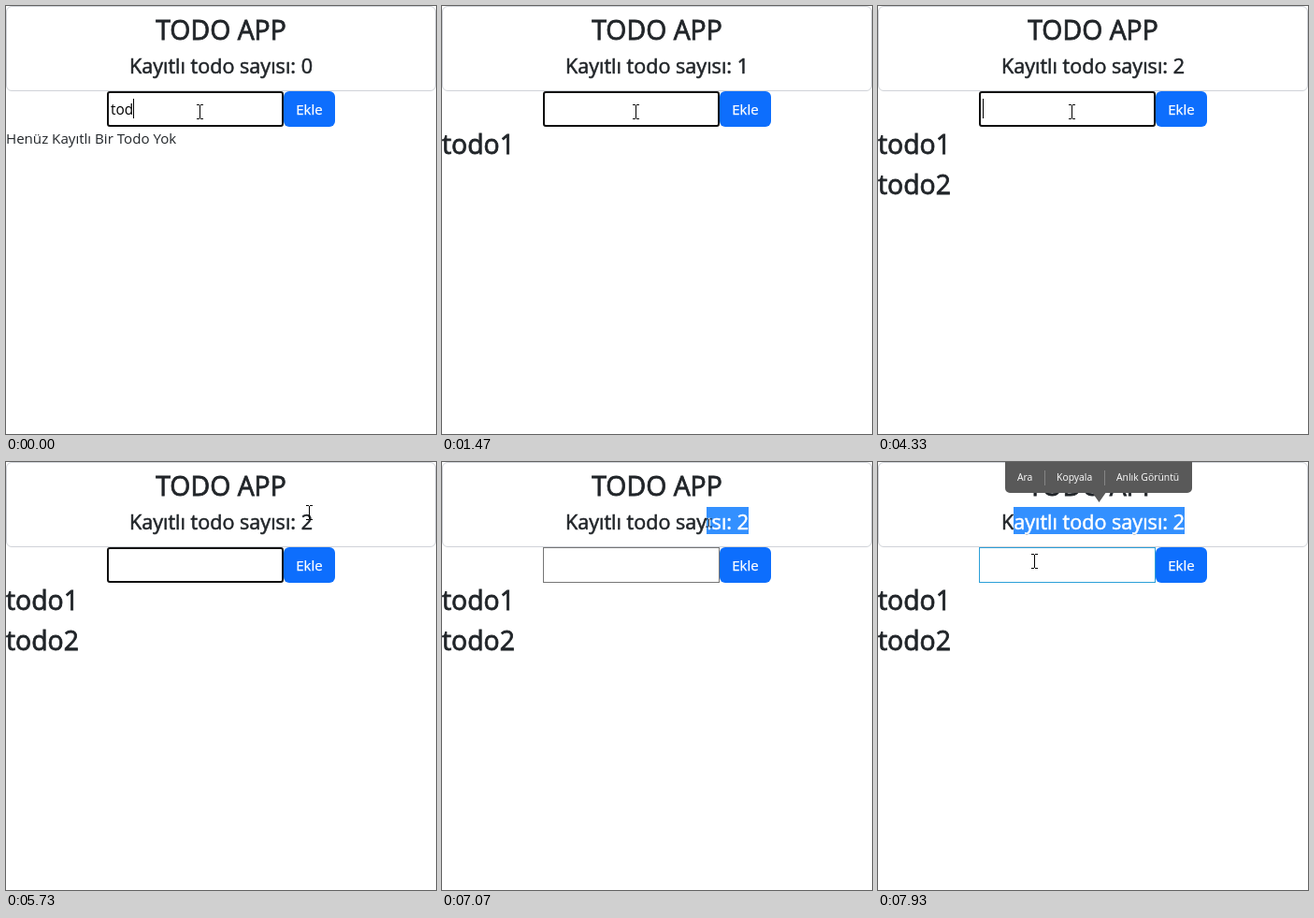
Write an HTML page that moves like this. It is 460 px wide and 457 px high and loops after 8 s.

```html
<!DOCTYPE html>
<html lang="tr">
<head>
<meta charset="utf-8">
<title>Todo App</title>
<style>
  html, body { margin: 0; width: 100%; height: 100%; overflow: hidden; background: #fff; }
  svg { display: block; width: 460px; height: 457px; font-family: "Open Sans", "Noto Sans", sans-serif; }
  text { color: #212529; fill: currentColor; stroke: currentColor; stroke-width: 0; white-space: pre; }
  /* A thin outline gives the medium weight between regular and semibold. */
  .big { font-size: 28.4px; stroke-width: .8px; }
  .count { font-size: 21.55px; stroke-width: .55px; }
  .body { font-size: 15.1px; }
  .typed { font-size: 15.4px; color: #000; }
  .mid { text-anchor: middle; }
  .white { color: #fff; }
  .label { stroke-width: .25px; }
  .tip text { font-size: 10.4px; color: #fff; }
  .crisp { shape-rendering: crispEdges; }
</style>
</head>
<body>
<svg viewBox="0 0 460 457">
  <defs><clipPath id="selClip"><rect id="clipBox" y="48" height="29"/></clipPath></defs>

  <rect x=".5" y=".5" width="459" height="90" rx="5.5" fill="#fff" stroke="#d0d3d8"/>
  <text class="big mid" x="230" y="36">TODO APP</text>
  <text class="count mid" id="count" x="230" y="72"></text>
  <g id="selection">
    <rect id="selBox" y="48" height="29" fill="#3390ff"/>
    <text class="count mid white" id="countSel" x="230" y="72" clip-path="url(#selClip)"></text>
  </g>

  <rect id="focused" x="109" y="92" width="187" height="36" rx="2" fill="#fff" stroke="#101010" stroke-width="2"/>
  <rect id="blurred" x="108.5" y="91.5" width="188" height="37" fill="#fff" stroke="#767676"/>
  <text class="typed" id="typed" x="112" y="116"></text>
  <rect class="crisp" id="caret" y="99" width="1" height="21"/>
  <rect x="297" y="91" width="55" height="38" rx="6" fill="#0d6efd"/>
  <text class="body mid white label" x="324.5" y="116">Ekle</text>

  <text class="body" id="empty" x="0" y="147">Henüz Kayıtlı Bir Todo Yok</text>
  <text class="big" id="item1" x="0" y="158">todo1</text>
  <text class="big" id="item2" x="0" y="201">todo2</text>

  <g class="tip" id="tip">
    <path d="M136 0H336V28a5 5 0 0 1-5 5H243.500L236.500 43L229.500 33H141a5 5 0 0 1-5-5Z" fill="#595959"/>
    <path class="crisp" d="M178.500 9V25M242.500 9V25" stroke="#858585"/>
    <text x="149" y="20">Ara</text>
    <text x="191" y="20">Kopyala</text>
    <text x="255" y="20">Anlık Görüntü</text>
  </g>

  <path class="crisp" id="beam" fill="none" stroke="#000" d="M-3 -7.500H0M1 -7.500H4M.5 -7V7M-3 7.500H0M1 7.500H4"/>
  <path id="arrow" fill="#fff" stroke="#000" stroke-linejoin="round"
    d="M.5 .5V16.500L4.200 13L6.600 18.500L9 17.500L6.600 12H11.500Z"/>
</svg>
<script>
  const LOOP = 8000, FPS = 15;
  const el = Object.fromEntries([...document.querySelectorAll("[id]")].map(e => [e.id, e]));

  // time, input text, caret visible
  const typing = [
    [0, "tod", 1], [200, "todo", 1], [730, "todo1", 1], [1270, "todo1", 0],
    [1470, "", 0], [1800, "", 1], [2330, "", 0],
    [2530, "t", 1], [2730, "to", 1], [3200, "tod", 1], [3330, "todo", 1], [3800, "todo2", 1],
    [4330, "", 1], [4400, "", 0], [4870, "", 1], [5400, "", 0], [5930, "", 1], [6470, "", 0]
  ];

  // time, x, y, pointer shape from here on
  const path = [
    [0, 207, 113, "beam"], [5140, 207, 113, "beam"], [5330, 236, 97, "beam"],
    [5400, 256, 81, "arrow"], [5470, 276, 66, "beam"], [5600, 309, 45, "beam"],
    [5730, 324, 54, "beam"], [5800, 330, 57, "arrow"], [6000, 335, 63, "arrow"],
    [6730, 335, 63, "arrow"], [6860, 327, 64, "beam"], [7000, 304, 65, "beam"],
    [7200, 246, 65, "beam"], [7400, 177, 66, "beam"], [7530, 150, 66, "beam"],
    [7800, 150, 66, "beam"], [7870, 158, 86, "arrow"], [7930, 167, 106, "beam"]
  ];

  const lastAt = (list, t) => list.findLastIndex(k => k[0] <= t);
  const show = (node, on) => node.style.display = on ? "" : "none";

  function pointerAt(t) {
    const i = lastAt(path, t), a = path[i], b = path[i + 1] || a;
    const p = b === a ? 0 : (t - a[0]) / (b[0] - a[0]);
    const mix = n => Math.round(a[n] + (b[n] - a[n]) * p);
    return { x: mix(1), y: mix(2), shape: a[3] };
  }

  function setText(node, s) {
    if (node.textContent !== s) node.textContent = s;
  }

  // The selection runs from the glyph edge nearest the pointer to the line's end.
  function select(x) {
    const label = el.count, n = label.getNumberOfChars();
    const end = label.getEndPositionOfChar(n - 1).x;
    let start = end;
    for (let i = 0; i < n; i++) {
      const edge = label.getStartPositionOfChar(i).x;
      if (Math.abs(edge - x) < Math.abs(start - x)) start = edge;
    }
    for (const box of [el.selBox, el.clipBox]) {
      box.setAttribute("x", Math.round(start));
      box.setAttribute("width", Math.max(0, Math.round(end) - Math.round(start)));
    }
  }

  function draw(t) {
    const [, text, caretOn] = typing[lastAt(typing, t)];
    const count = t < 1470 ? 0 : t < 4330 ? 1 : 2;
    const focus = t < 6730, dragging = t >= 6790;

    for (const node of [el.count, el.countSel]) setText(node, "Kayıtlı todo sayısı: " + count);
    show(el.empty, count === 0);
    show(el.item1, count > 0);
    show(el.item2, count > 1);

    setText(el.typed, text);
    const width = text ? el.typed.getComputedTextLength() : 0;
    el.caret.setAttribute("x", Math.floor(112 + width));
    show(el.caret, focus && caretOn);
    show(el.focused, focus);
    show(el.blurred, !focus);
    el.blurred.setAttribute("stroke", t >= 7925 ? "#2b9fd8" : "#767676");

    const step = Math.floor(t * FPS / 1000 + 0.1) * 1000 / FPS;
    const { x, y, shape } = pointerAt(step);
    show(el.selection, dragging);
    if (dragging) select(pointerAt(Math.min(step, 7600)).x);
    show(el.tip, t >= 7730);

    const overSelection = dragging && y < 77;
    show(el.beam, shape === "beam");
    show(el.arrow, shape === "arrow");
    el[shape].setAttribute("transform",
      `translate(${x} ${y})` + (shape === "beam" && overSelection ? " scale(1 .55)" : ""));
  }

  function tick() {
    draw(performance.now() % LOOP);
    requestAnimationFrame(tick);
  }
  tick();
</script>
</body>
</html>
```
